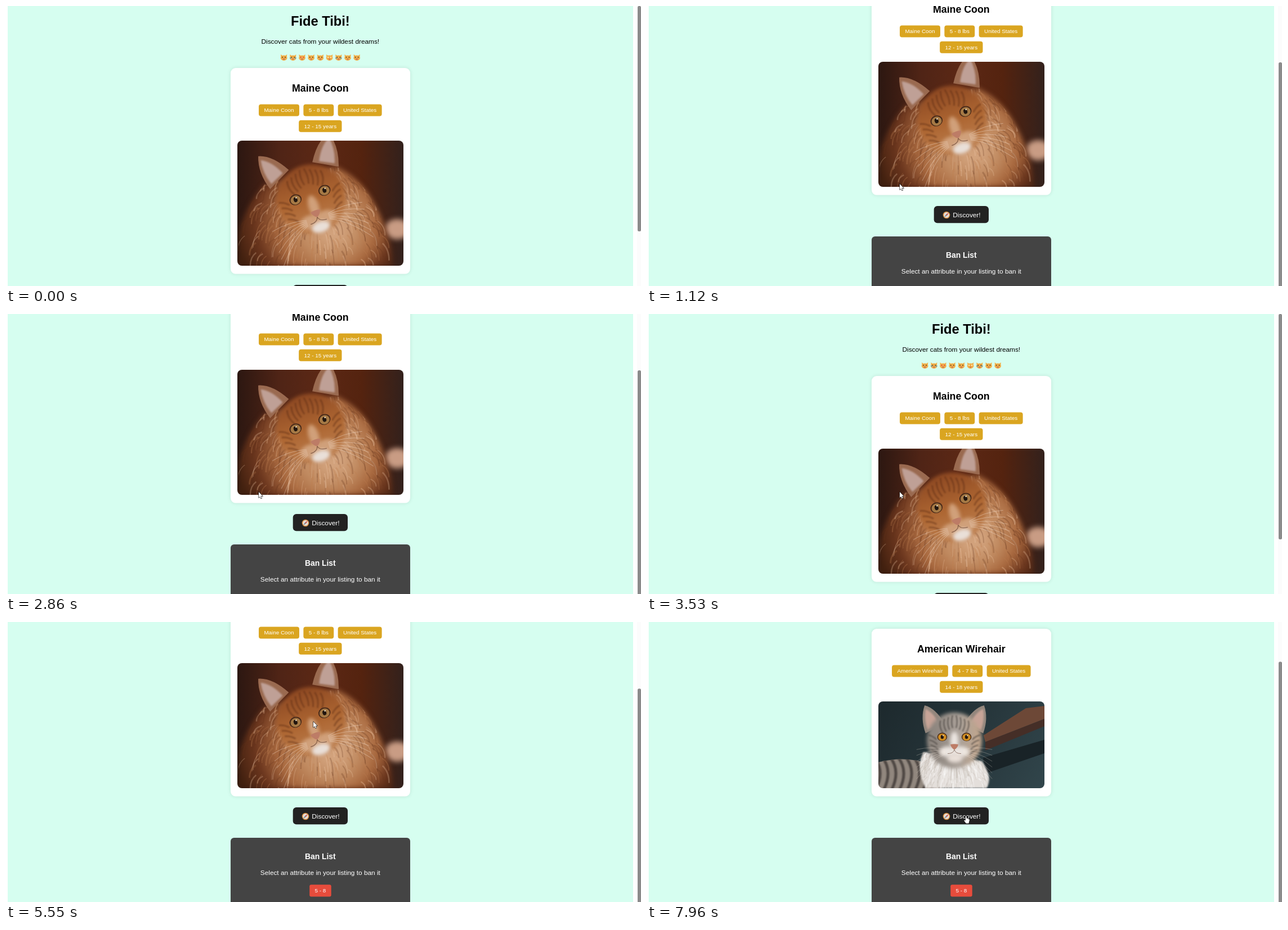
Recreate the animation shown at these times as an HTML page with a canvas. Size 1128 px wide and 497 px high, loop 8 s.

```html
<!DOCTYPE html>
<html lang="en">
<head>
<meta charset="utf-8">
<title>Cat discovery</title>
<style>
html, body { margin: 0; width: 100%; height: 100%; overflow: hidden; background: #fff; }
canvas { display: block; width: 1128px; height: 497px; }
</style>
</head>
<body>
<canvas id="stage" width="1128" height="497"></canvas>
<script>
const LOOP = 8000, STEP = 70;
const CENTER = 558.3, PHOTO_TOP = 239;
const SWAP = 7430, LOADED = 7960, BANNED = 4620;
const ctx = document.getElementById('stage').getContext('2d');

// start, end, scroll offset
const SCROLLS = [
  [1010, 1120, 140], [2390, 2530, 0], [2790, 2860, 140],
  [3400, 3530, 0], [4880, 5020, 166], [LOADED, LOADED, 98]
];
// start, end, x, y
const MOVES = [
  [70, 200, 488, 192], [450, 590, 449, 316], [3860, 4320, 562, 178], [4560, 4680, 542, 177],
  [5550, 5550, 546, 177], [5820, 5990, 579, 244], [6180, 6500, 565, 345], [7100, 7230, 563, 344]
];

const mix = (a, b, p) => a + (b - a) * p;
const smooth = p => p * p * (3 - 2 * p);
const easeIn = p => p ** 2.16;

// Share of a move done, advancing in screen updates of about STEP ms
function progress(t, start, end) {
  if (t < start) return 0;
  if (t >= end) return 1;
  const gaps = Math.round((end - start) / STEP);
  return (Math.floor((t - start) / (end - start) * gaps + 1e-6) + 1) / (gaps + 1);
}

const scrollAt = t => Math.round(SCROLLS.reduce(
  (y, [start, end, to]) => mix(y, to, easeIn(progress(t, start, end))), 0));

const pointerAt = t => MOVES.reduce(([x, y], [start, end, toX, toY]) => {
  const p = smooth(progress(t, start, end));
  return [mix(x, toX, p), mix(y, toY, p)];
}, [500, 193]);

const isHand = t => t < 450 || (t >= 4240 && t < 5550) || t >= 6430;

// Drawing helpers
function box(c, x, y, w, h, r, color) {
  c.fillStyle = color;
  c.beginPath();
  c.roundRect(x, y, w, h, r);
  c.fill();
}

function oval(c, x, y, rx, ry, color) {
  c.fillStyle = color;
  c.beginPath();
  c.ellipse(x, y, rx, ry, 0, 0, Math.PI * 2);
  c.fill();
}

function shape(c, path, color) {
  c.fillStyle = color;
  c.fill(new Path2D(path));
}

function stroke(c, path, color, width) {
  c.strokeStyle = color;
  c.lineWidth = width;
  c.stroke(new Path2D(path));
}

function soft(c, radius, paint) {
  c.filter = `blur(${radius}px)`;
  paint();
  c.filter = 'none';
}

function mirrored(c, paint) {
  for (const side of [-1, 1]) {
    c.save();
    c.scale(side, 1);
    paint(side);
    c.restore();
  }
}

function gradient(c, x1, y1, x2, y2, colors) {
  const fill = c.createLinearGradient(x1, y1, x2, y2);
  colors.forEach((color, i) => fill.addColorStop(i / (colors.length - 1), color));
  return fill;
}

function seeded(seed) {
  return () => (seed = (seed * 16807) % 2147483647) / 2147483647;
}

function picture(height, paint) {
  const canvas = document.createElement('canvas');
  canvas.width = 295;
  canvas.height = height;
  paint(canvas.getContext('2d'), seeded(77));
  return canvas;
}

// Short hairs falling outward from a point, kept inside a path
function fur(c, rnd, path, x0, y0, reach, tones) {
  c.save();
  c.clip(new Path2D(path));
  for (let i = 0; i < 420; i++) {
    const a = rnd() * Math.PI * 2, r = reach * (0.35 + rnd() * 0.75);
    const x = x0 + Math.cos(a) * r, y = y0 + Math.sin(a) * r;
    const sway = Math.cos(a) * 14, fall = 12 + rnd() * 20;
    stroke(c, `M${x} ${y} q${sway} ${fall / 3} ${sway} ${fall}`, tones[i % tones.length], 1 + rnd() * 2);
  }
  c.restore();
}

// Cat head in its own frame: eyes at (±27, 0)
function head(c, { x, y, turn, size, earDrop, nose, coat, ear, inner, stripe, pale, iris }) {
  c.save();
  c.translate(x, y);
  c.rotate(turn);
  c.scale(size, size);
  mirrored(c, () => {
    c.translate(0, earDrop);
    shape(c, 'M22 -54 Q42 -88 66 -94 Q76 -66 64 -32 Z', ear);
    soft(c, 1.5, () => shape(c, 'M34 -52 Q46 -78 64 -86 Q68 -62 59 -40 Z', inner));
  });
  soft(c, 3, () => oval(c, 0, 8, 61, 62, coat));
  soft(c, 1, () => mirrored(c, () => {
    for (let i = 0; i < 4; i++) {
      stroke(c, `M${4 + i * 9} ${i * 4 - 48} q4 14 ${-i * 2} 28`, stripe, 3);
      stroke(c, `M${57 - i * 2} ${i * 11 - 4} q-10 2 -17 10`, stripe, 3);
    }
  }));
  soft(c, 3, () => {
    oval(c, 0, nose - 14, 9, 20, pale);
    mirrored(c, () => oval(c, 14, nose + 11, 19, 12, pale));
    oval(c, 1, nose + 25, 17, 10, '#e9dfd8');
  });
  mirrored(c, side => {
    oval(c, 27, 0, 11, 9.5, '#4a2b1a');
    oval(c, 27, 0.5, 9, 8, iris);
    oval(c, 27, 0, 3.4, 4.4, '#21150e');
    oval(c, 27 + side * 2, -3, 1.3, 1.3, '#f2e5d0');
    stroke(c, `M0 ${nose + 6} q2 9 15 9`, 'rgba(90,55,40,.6)', 1.2);
    for (let i = 0; i < 6; i++)
      stroke(c, `M20 ${nose + 6 + i * 2} q30 ${i * 4 - 8} 64 ${i * 11}`, 'rgba(250,235,222,.5)', 0.7);
  });
  shape(c, `M-9 ${nose - 5} q9 -3 18 0 q-3 9 -9 11 q-6 -2 -9 -11`, '#bd7c66');
  c.restore();
}

const longhair = picture(222, (c, rnd) => {
  const body = 'M48 78 Q12 120 3 165 L0 222 H275 Q274 165 242 110 Q218 66 176 46 Z';
  c.fillStyle = gradient(c, 0, 0, 295, 0, ['#2c1711', '#4f2416', '#5c2815', '#54230f', '#33211c']);
  c.fillRect(0, 0, 295, 222);
  soft(c, 5, () => oval(c, 284, 157, 22, 18, '#c99c84'));
  const coat = c.createRadialGradient(170, 160, 15, 150, 135, 160);
  ['#d2a27c', '#c08a60', '#a9693f', '#6a351d', '#41200f'].forEach((color, i) => coat.addColorStop(i / 4, color));
  soft(c, 4, () => shape(c, body, coat));
  fur(c, rnd, body, 140, 105, 130, ['rgba(232,194,162,.28)', 'rgba(95,48,24,.25)', 'rgba(190,125,80,.3)']);
  head(c, {
    x: 129, y: 96.5, turn: -0.316, size: 1, earDrop: 0, nose: 35,
    coat: gradient(c, 0, -50, 0, 70, ['#8f4a23', '#ad6632', '#bf8354']),
    ear: '#9a6a50', inner: '#bfa096', stripe: 'rgba(88,40,18,.4)', pale: '#d0a07a', iris: '#a67a45'
  });
});

const shorthair = picture(154, (c, rnd) => {
  const body = 'M0 108 Q45 96 90 110 L114 154 H0 Z';
  c.fillStyle = gradient(c, 0, 0, 295, 154, ['#1d292d', '#26353a', '#31454b']);
  c.fillRect(0, 0, 295, 154);
  shape(c, 'M186 100 L295 68 V92 L190 128 Z', '#192327');
  shape(c, 'M187 60 L262 12 L295 8 V31 L190 72 Z', '#6d4837');
  shape(c, 'M190 72 L295 31 V44 L190 87 Z', '#452e27');
  shape(c, body, '#91877e');
  c.save();
  c.clip(new Path2D(body));
  for (let i = 0; i < 9; i++)
    soft(c, 1, () => stroke(c, `M${i * 14 - 8} 98 q20 24 4 58`, '#4f4844', 5));
  c.restore();
  const chest = 'M80 90 Q66 120 84 154 H192 Q204 136 184 106 Z';
  soft(c, 1.5, () => shape(c, chest, '#e4dfdb'));
  fur(c, rnd, chest, 135, 80, 70, ['rgba(170,160,152,.2)', 'rgba(255,255,255,.3)']);
  head(c, {
    x: 135, y: 63, turn: 0, size: 0.8, earDrop: 24, nose: 22,
    coat: gradient(c, -40, 0, 60, 0, ['#8f8780', '#aaa199', '#c3a68c']),
    ear: '#94877d', inner: '#c7a497', stripe: 'rgba(62,56,52,.55)', pale: '#ebe5e0', iris: '#cf8d22'
  });
});

// Page parts
function label(str, x, y, size, color = '#000', weight = '', align = 'center') {
  ctx.font = `${weight} ${size}px "Liberation Sans", Arial, sans-serif`;
  ctx.textAlign = align;
  ctx.fillStyle = color;
  ctx.fillText(str, x, y);
}

function emojiCat(x, y, i) {
  const coat = '#f2b04a', scared = i === 5;
  ctx.save();
  ctx.translate(x, y);
  mirrored(ctx, side => {
    shape(ctx, 'M5.6 -5.5 L1 -2.5 L5 1 Z', coat);
    if (!side) return;
  });
  oval(ctx, 0, 0.7, 5.8, 4.7, coat);
  mirrored(ctx, () => {
    oval(ctx, 2.5, -0.4, 1.1, 1.1, i === 2 ? '#de3f45' : scared ? '#fff3cf' : '#70502a');
    if (i % 5 === 1) oval(ctx, 4.2, 1, 1.2, 1.2, '#5a9fbd');
  });
  oval(ctx, 0, 2.8, i % 2 ? 1.8 : 2.3, 1.1, '#c4705a');
  ctx.restore();
}

function compass(x, y) {
  ctx.save();
  ctx.translate(x, y);
  oval(ctx, 0, 0, 6.3, 6.3, '#d98d3c');
  oval(ctx, 0, 0, 4.8, 4.8, '#e6dfd9');
  shape(ctx, 'M4 -4 L1 1 L-1 -1 Z', '#cf4b43');
  shape(ctx, 'M-4 4 L1 1 L-1 -1 Z', '#77868e');
  ctx.restore();
}

function pillRow(words, y) {
  const size = 9.87, pad = 9.4, gap = 7.4;
  ctx.font = `${size}px "Liberation Sans", Arial, sans-serif`;
  const widths = words.map(word => ctx.measureText(word).width + pad * 2);
  let x = CENTER - (widths.reduce((a, b) => a + b) + gap * (words.length - 1)) / 2;
  words.forEach((word, i) => {
    box(ctx, x, y, widths[i], 21, 4, '#daa520');
    label(word, x + pad, y + 13.9, size, '#fff', '', 'left');
    x += widths[i] + gap;
  });
}

function drawCard(t, photo) {
  const [breed, weight, years] = t >= SWAP
    ? ['American Wirehair', '4 - 7 lbs', '14 - 18 years']
    : ['Maine Coon', '5 - 8 lbs', '12 - 15 years'];
  ctx.save();
  ctx.shadowColor = 'rgba(0,0,0,.1)';
  ctx.shadowBlur = 7.4;
  box(ctx, 399, 110, 319, PHOTO_TOP + photo.height - 95.4, 9, '#fff');
  ctx.restore();
  label(breed, CENTER, 151.8, 17.76, '#000', 'bold');
  pillRow([breed, weight, 'United States'], 174.4);
  pillRow([years], 202.8);
  ctx.save();
  ctx.beginPath();
  ctx.roundRect(411, PHOTO_TOP, 295, photo.height, 8);
  ctx.clip();
  ctx.drawImage(photo, 411, PHOTO_TOP);
  ctx.restore();
}

function drawControls(t) {
  box(ctx, 509.7, 34, 97.3, 30.3, 6, '#222');
  compass(532, 50);
  label('Discover!', 543.3, 54.2, 11.84, '#fff', '', 'left');
  box(ctx, 399, 88, 319, 160, 6, '#444');
  label('Ban List', CENTER, 125.8, 13.85, '#fff', 'bold');
  label('Select an attribute in your listing to ban it', CENTER, 154.2, 11.84, '#fff');
  if (t >= BANNED) {
    box(ctx, 539.2, 171.3, 38.5, 21.3, 3, '#e74c3c');
    label('5 - 8', CENTER, 185.3, 9.87, '#fff');
  }
}

function drawPage(t) {
  const photo = t >= LOADED ? shorthair : longhair;
  label('Fide Tibi!', CENTER, 35.3, 23.68, '#000', 'bold');
  label('Discover cats from your wildest dreams!', CENTER, 67.2, 11.84);
  for (let i = 0; i < 9; i++) emojiCat(493.6 + i * 16.2, 91.5, i);
  drawCard(t, photo);
  ctx.translate(0, PHOTO_TOP + photo.height);
  drawControls(t);
}

function drawScrollbar(t, scroll) {
  const limit = t >= LOADED ? 98 : t >= BANNED ? 166 : 140;
  const ratio = 0.7;
  ctx.fillStyle = '#fcfcfc';
  ctx.fillRect(1121, 0, 7, 497);
  box(ctx, 1122, scroll * ratio + (scroll ? 2 : 0), 6, 498 - limit * ratio, 2.5, '#8b8b8b');
}

function drawPointer(t) {
  if (t < 70) return;
  const path = new Path2D(isHand(t)
    ? 'M2.8 1 Q3.7 -.6 4.6 1 V4.6 L9 6 L10 7.2 L8.4 13.6 H3.8 L.2 8.8 L1 7.6 L2.8 8.6 Z'
    : 'M0 0 V10 L2.3 7.9 L3.9 11.4 L5.4 10.7 L3.9 7.3 H7.1 Z');
  ctx.save();
  ctx.translate(...pointerAt(t));
  ctx.lineJoin = 'round';
  ctx.strokeStyle = '#111';
  ctx.lineWidth = 1.2;
  ctx.stroke(path);
  ctx.fillStyle = '#fff';
  ctx.fill(path);
  ctx.restore();
}

function draw(t) {
  const scroll = scrollAt(t);
  ctx.fillStyle = '#fff';
  ctx.fillRect(0, 0, 1128, 497);
  ctx.fillStyle = '#d6fef0';
  ctx.fillRect(3, 0, 1111, 497);
  ctx.save();
  ctx.translate(0, -scroll);
  drawPage(t);
  ctx.restore();
  drawScrollbar(t, scroll);
  drawPointer(t);
}

const begin = performance.now();
function tick() {
  draw((performance.now() - begin) % LOOP);
  requestAnimationFrame(tick);
}
tick();
</script>
</body>
</html>
```
